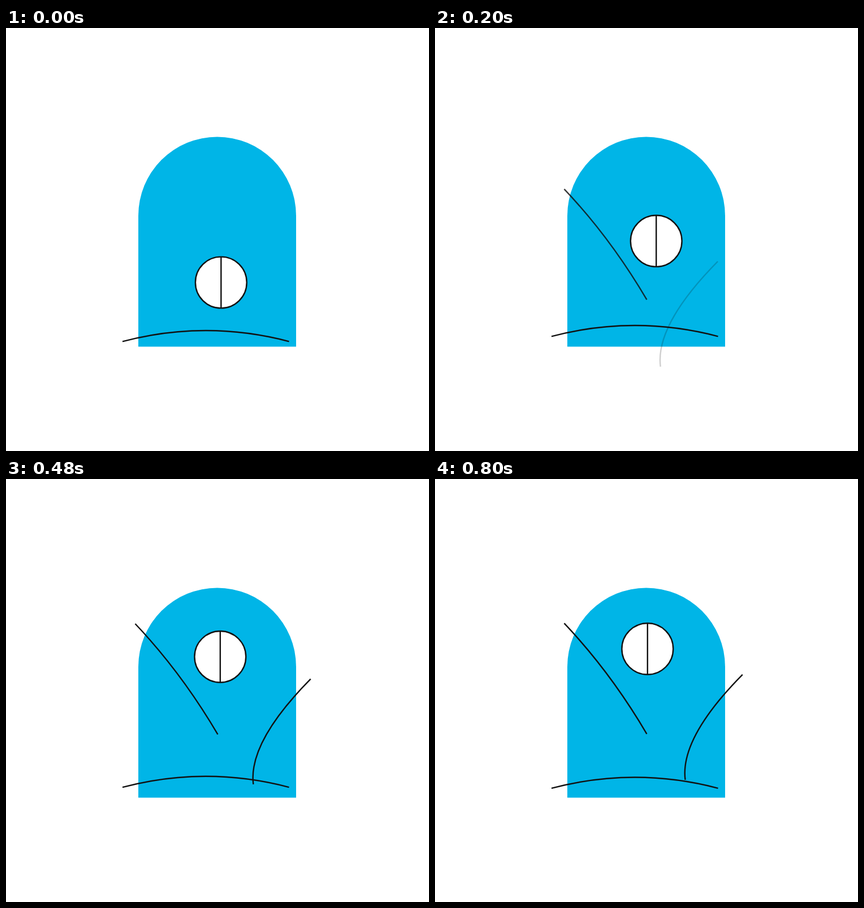
These frames come from a looping animation (748x748 px, 2000 ms). An HTML page:

```html
<!DOCTYPE html>
<html lang="en">
<head>
<meta charset="utf-8">
<title>Arch</title>
<style>
  html, body { margin: 0; width: 100%; height: 100%; overflow: hidden; background: #fff; }
  svg { display: block; width: 100vw; height: 100vh; }
  .ink { fill: none; stroke: #111; stroke-width: 2.4; }
</style>
</head>
<body>
<svg viewBox="0 0 748 748">
  <path fill="#00b5e7" d="M234 563.5V332A139.5 139.5 0 0 1 513 332V563.5Z"/>
  <g class="ink">
    <path id="left" d="M228.5 255.2Q310 341.2 374.5 450.8"/>
    <path id="right" d="M543.8 345.8Q433 458 442.5 532"/>
    <path id="bow" d="M206 546.8Q353.5 508.3 500.5 546.8"/>
    <g id="ball">
      <circle r="45.4" fill="#fff"/>
      <path d="M0-45.4V45.4"/>
    </g>
  </g>
</svg>
<script>
const LOOP = 2000, STEP = 40, END = 800;
const SLANT = -1.53;

const [left, right, bow, ball] =
  ["left", "right", "bow", "ball"].map(id => document.getElementById(id));

const mix = (a, b, p) => a + (b - a) * p;
const span = (t, from, to) => Math.min(1, Math.max(0, (t - from) / (to - from)));
const easeOut = (p, power) => 1 - (1 - p) ** power;

// Gentle start, long soft finish
function settle(p) {
  const u = easeOut(p, 2);
  return u * u * (3 - 2 * u);
}

// Out to a peak, then back to rest at zero
function swing(t, from, peak, turn) {
  return t < turn
    ? mix(from, peak, easeOut(t / turn, 1.5))
    : mix(peak, 0, settle(span(t, turn, END)));
}

function place(node, x, y, opacity = 1) {
  node.setAttribute("transform", `translate(${x.toFixed(2)} ${y.toFixed(2)})`);
  node.setAttribute("opacity", opacity.toFixed(3));
}

function draw(t) {
  const slide = mix(-50, 0, settle(span(t, 125, 765)));
  place(left, 0, mix(100, 0, easeOut(span(t, 0, 600), 3)), span(t, 0, 240));
  place(right, slide, slide * SLANT, span(t, 145, 415));
  place(bow, 0, swing(t, 7.5, -4.2, 320));
  place(ball, 375.8 + swing(t, 4.5, 15.4, 200),
    mix(450, 300.4, easeOut(span(t, 30, END), 2.7)));
}

const start = performance.now();
function tick() {
  const t = (performance.now() - start) % LOOP;
  draw(Math.floor(t / STEP) * STEP);
  requestAnimationFrame(tick);
}
tick();
</script>
</body>
</html>
```
